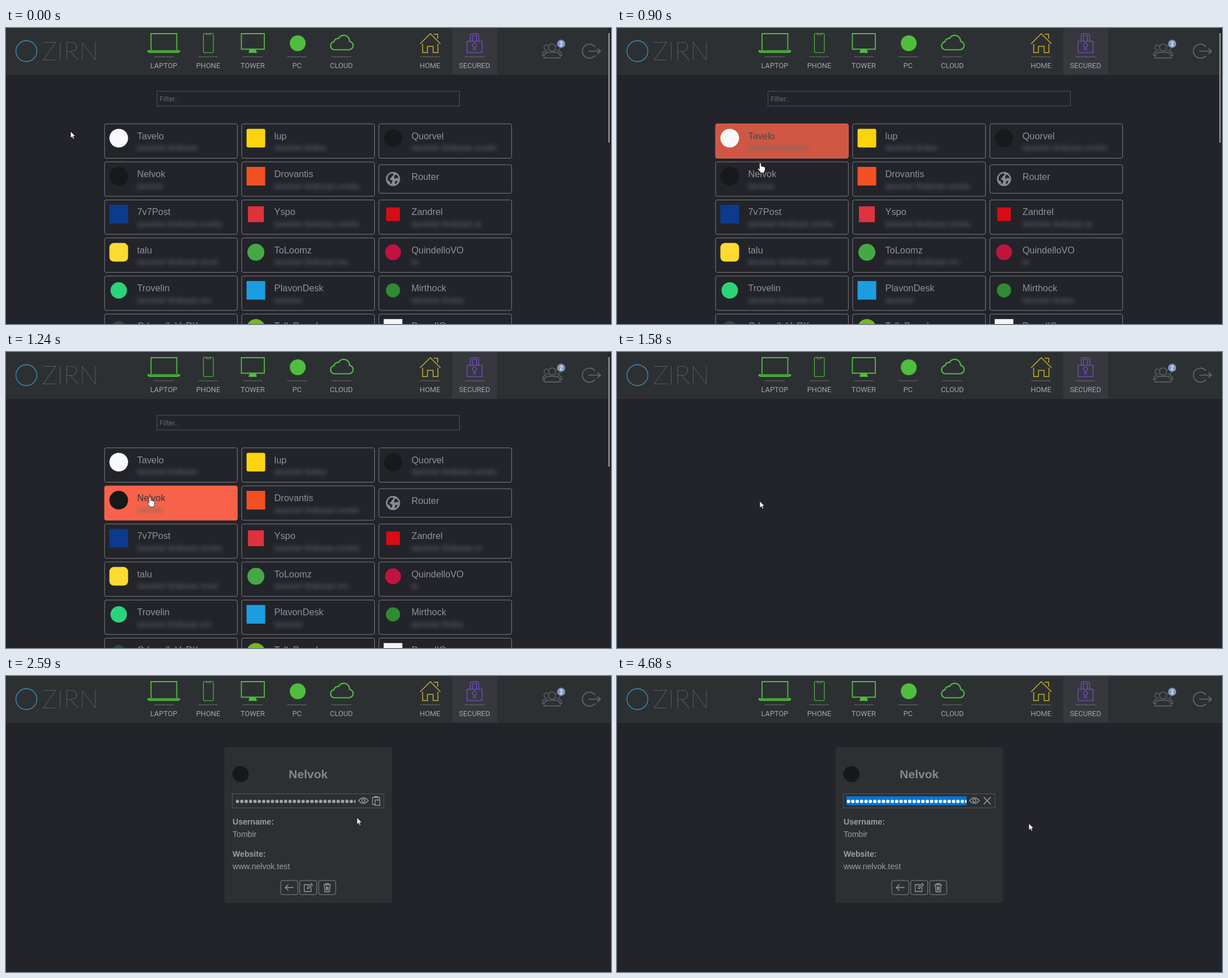
An HTML page for the animation above (4740 ms loop, 1068 px wide and 524 px high).

```html
<!DOCTYPE html>
<html lang="en">
<head>
<meta charset="utf-8">
<title>Vault</title>
<style>
  html, body { margin: 0; width: 100%; height: 100%; overflow: hidden; background: #23242a; }
  svg { display: block; }
  text { font-family: "Liberation Sans", Arial, sans-serif; }
  .nav text, .hint { font-family: Roboto, sans-serif; }
  .nav text { font-size: 12.8px; fill: #a3a5a6; text-anchor: middle; }
  .nav path, .line { fill: none; }
  .brand { font: 100 46px Lato, sans-serif; fill: #85888a; }
  .name { font-size: 16.3px; }
  .sub { font-size: 14px; fill: #686b71; filter: blur(3.5px); }
  .detail text { font-size: 14.1px; fill: #9b9d9f; }
  .detail .b { font-weight: bold; }
  .detail .title { font-size: 21px; fill: #85878b; text-anchor: middle; }
</style>
</head>
<body>
<svg width="1068" height="524" viewBox="0 0 1068 524">
  <rect width="1068" height="524" fill="#23242a"/>
  <rect width="1068" height="83" fill="#2d3033"/>
  <rect x="788" width="79" height="83" fill="#36383d"/>

  <circle cx="36" cy="41" r="18.5" class="line" stroke="#3a93c0" stroke-width="1.3"/>
  <text class="brand" x="63" y="57">ZIRN</text>

  <g class="nav">
    <g id="labels"></g>
    <g stroke="#4fbd3f" stroke-width="1.8">
      <path d="M256 39V10h45.500V39"/>
      <path d="M250.500 40.500h56q-.5 2.500-4 2.500h-48q-3.500 0-4-2.500z"/>
      <path stroke-width="1.200" d="M351 9.500h12.500q2.500 0 2.500 2.500v29q0 2.500-2.500 2.500H351q-2.500 0-2.500-2.500V12q0-2.500 2.500-2.500zM353 10q.5 2 2 2h4.500q1.500 0 2-2"/>
      <path d="M415.500 10h40.500v27.500h-40.500z"/>
      <path style="fill:#4fbd3f" stroke="none" d="M430 38h11l2 6h-15z"/>
      <circle cx="515" cy="27" r="14" fill="#4fbd3f" stroke="none"/>
      <path stroke-width="2.200" d="M580 38.500a7.200 7.200 0 0 1-1-14.300 7 7 0 0 1 8-5.600 10.300 10.300 0 0 1 19.500 5 7.500 7.500 0 0 1-1 14.900z"/>
    </g>
    <path stroke="#c4b02f" stroke-width="1.500" d="M731 28l18-18 18 18M755 11h7v8M735.500 28v15.500h8.500v-11h10v11h8.500V28"/>
    <g stroke="#6d48b5" stroke-width="1.600">
      <path d="M814 23.500h26.500v20H814zM819.500 23V14q0-4 4-4h7q4 0 4 4v9M823.500 23v-8q0-2 2-2h3q2 0 2 2v8"/>
      <path d="M825.500 33.500a3.500 3.500 0 1 1 3 0v5h-3z"/>
    </g>
    <g stroke="#66696c" stroke-width="1.300">
      <circle cx="964" cy="34.500" r="6.300" fill="none"/>
      <path d="M949.500 53q0-9.500 8-10h13q8 .5 8 10z"/>
      <path id="mate" d="M957 38.500a4.600 4.600 0 1 1 .5-7M953 41q-6 1-6 7.500h3.500"/>
      <use href="#mate" transform="translate(1928) scale(-1 1)"/>
      <path stroke-width="1.700" d="M1039.800 33.300a12.500 12.500 0 1 0 0 15.400M1028 41h21M1044 36.500l5.500 4.500-5.500 4.500"/>
    </g>
    <circle cx="980" cy="28" r="7.200" fill="#8095c0"/>
    <text x="980" y="31.700" style="font:bold 10px Roboto,sans-serif;fill:#f0f2f6">2</text>
  </g>

  <g id="list">
    <rect x="1063" width="5" height="524" fill="#23242a"/>
    <rect x="1063.500" y="9" width="2" height="194" fill="#aaacae"/>
    <rect x="266.500" y="112" width="534" height="26" class="line" stroke="#505358"/>
    <text class="hint" x="271" y="129.500" font-size="12.300" fill="#66696d">Filter..</text>
    <g id="cards"></g>
  </g>

  <g id="detail" class="detail">
    <rect x="385.500" y="126" width="296" height="275.500" rx="4" fill="#2d3033"/>
    <circle cx="414" cy="173.500" r="14.300" fill="#16181a"/>
    <text class="b title" x="533.500" y="181">Nelvok</text>
    <rect x="399.500" y="208.500" width="267.500" height="25" class="line" stroke="#54575a"/>
    <rect id="marked" x="405" y="213" width="212" height="15.500" fill="#0078d7"/>
    <svg width="617" height="524"><path id="dots" d="M408.600 222H619" stroke-width="6" stroke-linecap="round" stroke-dasharray="0 7.730"/></svg>
    <g class="line" stroke="#9a9da0" stroke-width="1.300">
      <path d="M622.500 220.500q8.500-10 17 0-8.500 10-17 0z"/>
      <circle cx="631" cy="220.500" r="2.600"/>
      <path id="copy" d="M651 227.500h-4v-12.500h12.500v4M650.500 215v-1.500h5.500v1.500M651.500 219.500h8.500v9.500h-8.500z"/>
      <path id="cross" stroke-width="1.500" d="M647.500 214.500l12 12.500M659.500 214.500l-12 12.500"/>
      <path id="frames" stroke="#84878a" stroke-width="1"/>
      <path d="M493 374.500h14.500M498.500 369l-5.500 5.500 5.500 5.500"/>
      <path d="M535 369.500h-8.500v12h12v-7M532 376.500l.8-3 6-6 2.200 2.200-6 6z"/>
      <path d="M560.500 369.500h13M564.500 369.500v-2h5v2M562 370l1 12h8l1-12M565.300 372.500v7M567 372.500v7M568.800 372.500v7"/>
    </g>
    <text class="b" x="400" y="263">Username:</text>
    <text x="400" y="285">Tombir</text>
    <text class="b" x="400" y="320">Website:</text>
    <text x="400" y="342">www.nelvok.test</text>
  </g>

  <g id="pointer" stroke="#17181b" stroke-width=".8" fill="#fff">
    <path id="arrow" d="M0 0v12l2.800-2.600 1.900 4.200 2-.9-1.900-4.100h3.800z"/>
    <path id="hand" d="M-1.500 1q1.500-2 3 0v5q1.500-.9 2.500.4 1.600-.7 2.400.6 2-.5 2.100 1.500v4q-.5 2-1.500 3.500v1.500H.5q-1.500-3-4.500-6-.9-2 .8-2l1.700 1.500z"/>
  </g>
</svg>

<script>
const $ = id => document.getElementById(id);
const LOOP = 4740, START = 480, STEP = 68.6;

const tabs = [["LAPTOP", 278.5], ["PHONE", 357], ["TOWER", 435.5], ["PC", 513.7],
              ["CLOUD", 592], ["HOME", 748.5], ["SECURED", 827]];
$("labels").innerHTML = tabs.map(([label, x]) =>
  `<path d="M${x - 17.5} 51h35" stroke="#6c6f71"/><text x="${x}" y="71">${label}</text>`).join("");

// name, length of the blurred line, badge colour, badge size, corner radius
const entries = [
  ["Tavelo", 16, "#f8f9fa", 33, 17], ["lup", 14, "#fbd40c", 33, 3], ["Quorvel", 23, "#18191c", 32, 16],
  ["Nelvok", 6, "#16181a", 33, 17], ["Drovantis", 23, "#f25022", 33, 0], ["Router", 0],
  ["7v7Post", 23, "#0c3a8c", 33, 0], ["Yspo", 23, "#e0323c", 28, 0], ["Zandrel", 19, "#d60d17", 24, 0],
  ["talu", 22, "#fddb31", 33, 8], ["ToLoomz", 20, "#46a845", 30, 15], ["QuindelloVO", 2, "#c0143f", 28, 14],
  ["Trovelin", 20, "#2bd47b", 29, 15], ["PlavonDesk", 7, "#1c9de0", 33, 0], ["Mirthock", 14, "#2f8a33", 25, 13],
  ["OrbundleVaRK", 12, "#2a4a3c", 26, 13], ["TallaBrand", 12, "#75b81c", 33, 17], ["DrondIQ", 12, "#f4f4f4", 33, 0]
];
const filler = "tavomer-lindosan-orvelu-tams";

const globe = (x, y) => `<circle cx="${x}" cy="${y}" r="12.5" fill="#888c91"/>
  <path transform="translate(${x} ${y})" fill="#23242a" d="M-9-5l4-4 5-1 1 3-3 2-1 3-3 1 2 3 3 1-1 4-2 2-2-5-4-2zM4-8l4 2 2 5-4-1-3 2-1-4zM4 4l4-1-2 5-3 1z"/>`;

$("cards").innerHTML = entries.map(([name, len, color, size, r], i) => {
  const x = 174 + i % 3 * 242.1, y = 169.7 + Math.floor(i / 3) * 67.35 + (len ? 0 : 5);
  const cx = x + 25, cy = y + 25.3;
  return `<rect id="card${i}" x="${x}" y="${y}" width="234.4" height="${len ? 60.8 : 50.5}" rx="3" fill="#f8624a" fill-opacity="0" stroke="#7b7e83"/>` +
    (len ? `<rect x="${cx - size / 2}" y="${cy - size / 2}" width="${size}" height="${size}" rx="${r}" fill="${color}"/>` : globe(cx, cy)) +
    `<text class="name" id="name${i}" x="${x + 57.5}" y="${y + 27}" fill="#8e9196">${name}</text>
     <text class="sub" x="${x + 57.5}" y="${y + 47.5}">${filler.slice(0, len)}</text>`;
}).join("");

$("frames").setAttribute("d", [485, 518.5, 552].map(x =>
  `M${x + 3} 362h24q3 0 3 3v19q0 3-3 3h-24q-3 0-3-3v-19q0-3 3-3z`).join(""));

// time, x, y of the pointer tip
const track = [
  [411, 114, 183], [620, 172, 187], [780, 226, 201], [840, 244, 222], [892, 253, 239],
  [1040, 254, 250], [1235, 254, 257], [1440, 253, 263], [1570, 252, 264], [1920, 252, 264],
  [2130, 340, 258], [2330, 510, 253], [2460, 595, 252], [2590, 636, 250],
  [3010, 656, 222], [3150, 659, 219], [4330, 659, 219], [4660, 727, 261]
];

const ramp = (t, from, to) => Math.min(1, Math.max(0, (t - from) / (to - from)));
const mix = (a, b, k) => `color-mix(in srgb, ${b} ${k * 100}%, ${a})`;
const show = (id, on) => $(id).style.display = on ? "" : "none";

function pointAt(t) {
  const n = track.findIndex(p => p[0] > t);
  if (n === 0) return track[0].slice(1);
  if (n < 0) return track[track.length - 1].slice(1);
  const [a, b] = [track[n - 1], track[n]], k = ramp(t, a[0], b[0]);
  return [a[1] + (b[1] - a[1]) * k, a[2] + (b[2] - a[2]) * k];
}

function glow(i, k) {
  const card = $("card" + i);
  card.style.fillOpacity = k;
  card.style.stroke = mix("#7b7e83", "#f8624a", k);
  $("name" + i).style.fill = mix("#8e9196", "#3a3535", k);
}

function draw(now) {
  let t = now % LOOP;
  t = t < START ? 0 : START + Math.floor((t - START) / STEP) * STEP;

  show("list", t < 1570);
  show("detail", t > 1710);
  glow(0, ramp(t, 610, 810) * (1 - ramp(t, 855, 1055)));
  glow(3, ramp(t, 895, 1110));

  const copied = t > 3075;
  show("marked", copied);
  show("copy", !copied);
  show("cross", copied);
  $("dots").style.stroke = copied ? "#fff" : "#9fa1a3";
  $("cross").style.stroke = mix("#a0a2a4", "#d9604a", ramp(t, 3060, 3360) * (1 - ramp(t, 4430, 4630)));

  const [x, y] = pointAt(t);
  const hand = t > 610 && t < 1570 || t > 2940 && t < 4420;
  $("pointer").setAttribute("transform", `translate(${x} ${y})`);
  show("hand", hand);
  show("arrow", !hand);
}

const begin = performance.now();
(function tick() {
  draw(performance.now() - begin);
  requestAnimationFrame(tick);
})();
</script>
</body>
</html>
```
